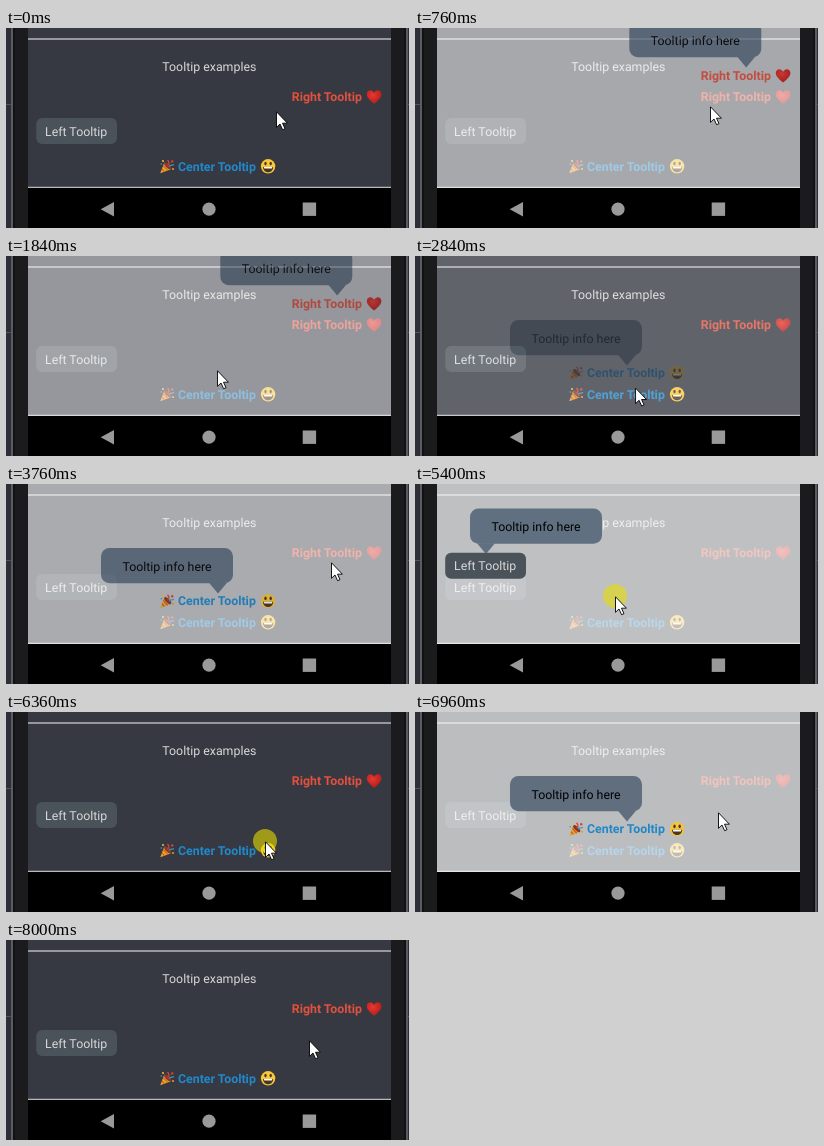
An HTML page for the animation above (8.52 s loop, 403 by 200 pixels).

```html
<!DOCTYPE html>
<html lang="en">
<head>
<meta charset="utf-8">
<title>Tooltip examples</title>
<style>
  html, body { margin: 0; width: 100%; height: 100%; overflow: hidden; background: #2d2e37; }
  svg { display: block; width: 403px; height: 200px; }
  text { font: 400 12.36px Roboto, sans-serif; fill: #d8d8d9; text-rendering: geometricPrecision; }
  .bold { font-weight: 700; }
  .mid { text-anchor: middle; }
  .modal { opacity: 0; }
</style>
</head>
<body>
<svg viewBox="0 0 403 200">
  <defs>
    <clipPath id="screen"><rect x="22" width="363" height="160"/></clipPath>
    <radialGradient id="heartFill" cx=".4" cy=".35">
      <stop stop-color="#e8392f"/><stop offset="1" stop-color="#c3221f"/>
    </radialGradient>
    <g id="bubble">
      <rect x="-66" width="132" height="35.2" rx="8.5" fill="#617080"/>
      <text class="mid" y="22.5" style="fill:#000">Tooltip info here</text>
    </g>
    <path id="arrow" d="M-9 -.8H9L0 10Z" fill="#617080"/>
    <rect id="veil" x="22" width="363" height="160" fill="#fafafa" fill-opacity=".7"/>
  </defs>

  <!-- phone body -->
  <path d="M0 76.5H403" stroke="#53545c"/>
  <rect x="5" width="397" height="200" fill="#5a5b63"/>
  <rect x="7" width="393" height="200" fill="#121214"/>
  <rect x="9" width="389" height="200" fill="#1b1b1d"/>
  <rect x="22" width="363" height="200" fill="#000"/>
  <rect x="22" width="363" height="160" fill="#363941"/>
  <path d="M22 11H385M22 159.4H385" stroke="#b9b6bd" stroke-width="1.4"/>
  <g fill="#999">
    <path d="M94.7 181.2L108 174V188.4Z"/>
    <circle cx="203" cy="181.2" r="6.6"/>
    <rect x="296.7" y="174.5" width="13.4" height="13.4"/>
  </g>

  <text class="mid" x="203.3" y="42.8">Tooltip examples</text>

  <g id="right">
    <text class="bold" x="285.8" y="73.2" style="fill:#e2503f">Right Tooltip</text>
    <path d="M368.1 75.8C363.6 72.1 360.8 69.6 360.8 66.3C360.8 61.8 366.2 60.8 368.1 65C370 60.8 375.4 61.8 375.4 66.3C375.4 69.6 372.6 72.1 368.1 75.8Z" fill="url(#heartFill)"/>
  </g>

  <g id="left">
    <rect x="30.2" y="90" width="80.8" height="26" rx="6" fill="#4a525a"/>
    <text x="39" y="107.7">Left Tooltip</text>
  </g>

  <g id="center">
    <path d="M158.3 134.5L154.3 145.2L165 141.2Z" fill="#f0a52c"/>
    <path d="M157.3 137.6L161.7 142.4M156 141L158.4 143.6" stroke="#c9632b" stroke-width="1.3"/>
    <ellipse cx="161.7" cy="137.9" rx="1.9" ry="4.6" transform="rotate(-45 161.7 137.9)" fill="#8a3a24"/>
    <path d="M161.5 137C164 136 163 133.5 161.5 132" fill="none" stroke="#d9443a" stroke-width="1.3"/>
    <path d="M163 138.5C164.5 136 166 138 168 136.5" fill="none" stroke="#4a94c0" stroke-width="1.2"/>
    <g>
      <circle cx="157" cy="133" r="1" fill="#f2c230"/>
      <circle cx="166.2" cy="133.4" r="1.2" fill="#d9443a"/>
      <circle cx="167" cy="141" r="1" fill="#e0a030"/>
      <circle cx="155.3" cy="136" r=".8" fill="#4a94c0"/>
    </g>
    <text class="bold" x="172" y="142.7" style="fill:#2089cc">Center Tooltip</text>
    <circle cx="262.1" cy="138.3" r="7.2" fill="#fac736"/>
    <path d="M257 138.9H267.2C267 146 257.2 146 257 138.9Z" fill="#493526"/>
    <path d="M257.8 139H266.4L265.9 140.6H258.3Z" fill="#fff"/>
    <ellipse cx="259.5" cy="135.6" rx="1.2" ry="1.8" fill="#493526"/>
    <ellipse cx="264.7" cy="135.6" rx="1.2" ry="1.8" fill="#493526"/>
  </g>

  <g clip-path="url(#screen)">
    <g class="modal" id="rightModal">
      <use href="#veil"/>
      <use href="#bubble" x="280.3" y="-6"/>
      <use href="#arrow" x="331.2" y="29.5"/>
      <use href="#right" y="-21.2"/>
    </g>
    <g class="modal" id="centerModal">
      <use href="#veil"/>
      <use href="#bubble" x="161" y="64"/>
      <use href="#arrow" x="212" y="99.5"/>
      <use href="#center" y="-21.2"/>
    </g>
    <g class="modal" id="leftModal">
      <use href="#veil"/>
      <use href="#bubble" x="121" y="24.5"/>
      <use href="#arrow" x="71" y="60"/>
      <use href="#left" y="-21.2"/>
    </g>
  </g>

  <g id="cursor">
    <circle id="press" r="12" fill="#e6dc00" fill-opacity=".6"/>
    <path d="M.5 .8V16.3L4 13L6.6 18.7L9 17.7L6.5 12.2H11.4Z" fill="#fff" stroke="#000" stroke-width=".9"/>
  </g>
</svg>
<script>
  const LOOP = 8520, STEP = 80;
  const el = id => document.getElementById(id);
  const clamp = v => Math.min(1, Math.max(0, v));
  const stepped = ms => Math.floor(ms / STEP) * STEP;

  // start, end, x, y
  const moves = [
    [80, 280, 295, 78],
    [1160, 1360, 215, 79],
    [1600, 1840, 211, 114],
    [1920, 2080, 201, 146],
    [2320, 2400, 201, 141],
    [2800, 3240, 325, 78],
    [3880, 4320, 97, 103],
    [4960, 5320, 200, 112],
    [5600, 6040, 262, 142],
    [6120, 6200, 259, 129],
    [6600, 6920, 303, 100]
  ];
  const presses = [
    [360, 520], [1440, 1600], [2480, 2800], [3320, 3560],
    [4400, 4640], [5400, 5520], [6360, 6520], [7520, 7600]
  ];
  // opening and closing times
  const modals = {
    rightModal: [[520, 1600]],
    centerModal: [[2800, 3560], [6520, 7520]],
    leftModal: [[4640, 5520]]
  };

  function fade(t, [open, close]) {
    if (t < open) return 0;
    if (t < close) return 1 - (1 - clamp((stepped(t - open) + 100) / 580)) ** 2;
    return 1 - clamp((stepped(t - close) + 50) / 530) ** 2;
  }

  function cursorAt(t) {
    let x = 270, y = 83;
    for (const [start, end, toX, toY] of moves) {
      if (t < start) break;
      const p = clamp((stepped(t - start) + STEP) / (end - start + STEP));
      x += (toX - x) * p;
      y += (toY - y) * p;
    }
    return [x, y];
  }

  function draw(now) {
    const t = now % LOOP;
    for (const id in modals) {
      el(id).style.opacity = Math.max(...modals[id].map(span => fade(t, span)));
    }
    el('cursor').setAttribute('transform', `translate(${cursorAt(t)})`);
    const pressed = presses.some(([from, to]) => t >= from && t < to);
    el('press').style.display = pressed ? 'inline' : 'none';
  }

  const begin = performance.now();
  function tick() {
    draw(performance.now() - begin);
    requestAnimationFrame(tick);
  }
  tick();
</script>
</body>
</html>
```
